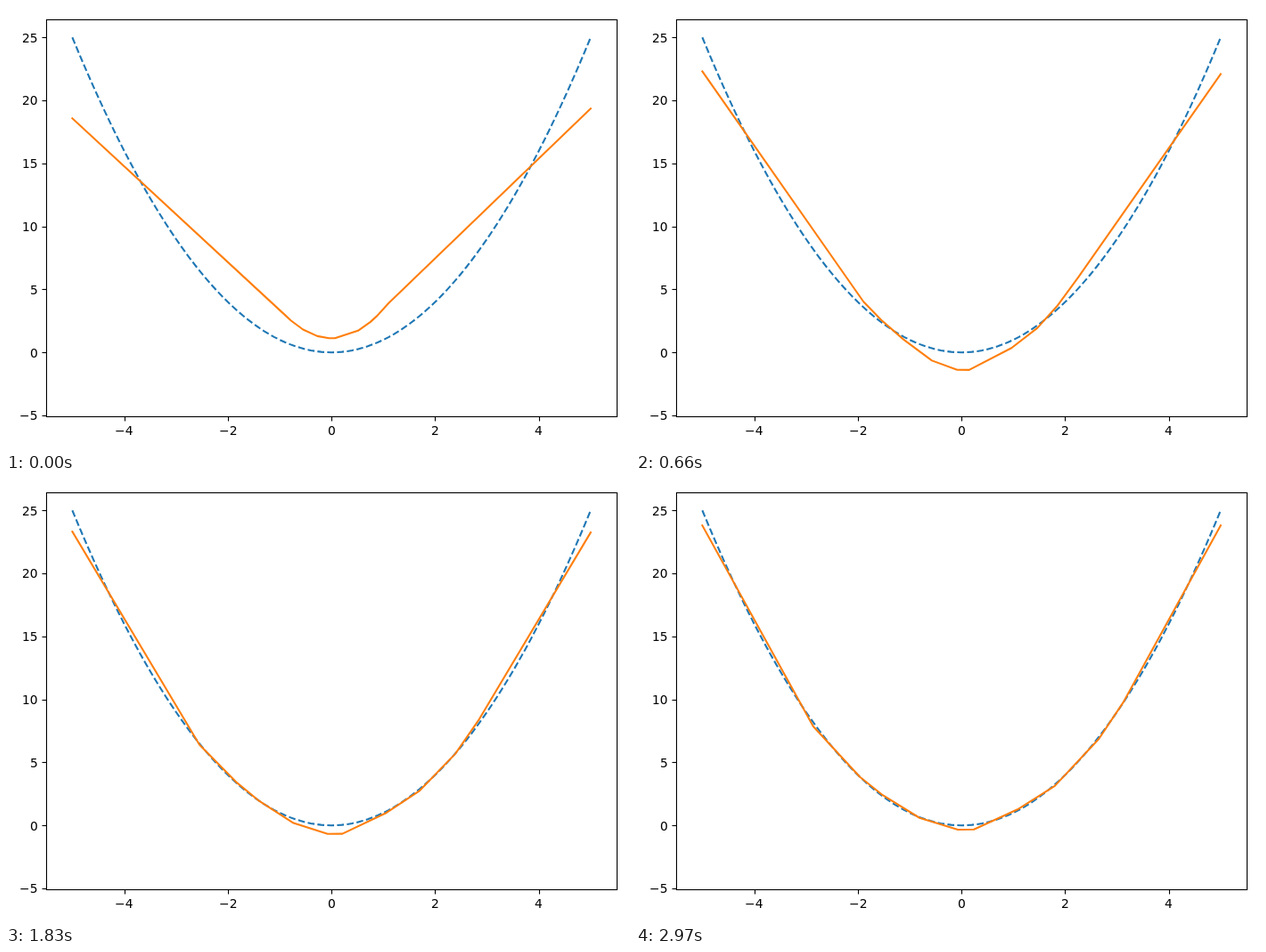
Write an HTML page with a canvas that moves like this. It is 700 by 500 pixels and loops after 3000 ms.

```html
<!DOCTYPE html>
<html lang="en">
<head>
<meta charset="utf-8">
<title>Curve fitting</title>
<style>
html, body { margin: 0; width: 700px; height: 500px; overflow: hidden; background: #fff; }
canvas { display: block; }
</style>
</head>
<body>
<canvas id="plot" width="700" height="500"></canvas>
<script>
const ctx = document.getElementById('plot').getContext('2d');
const LOOP = 3000, STEP = 30, EARLY = 420, LAST = LOOP - STEP;
const px = x => 365.15 + 58.15 * x;
const py = y => 389.2 - 14.158 * y;
const snap = v => Math.round(v) + 0.5;
const lerp = (a, b, u) => a + (b - a) * u;

// Each bend of the fit is [x, error against x²], after the fast phase and at the end.
const bends = [
  [[-1.6, 0.68], [-2.86, -0.33]],
  [[-1.42, 0.23], [-1.96, 0]],
  [[-1, -0.32], [-1.52, 0.09]],
  [[-0.5, -1.25], [-0.81, -0.06]],
  [[-0.09, -1.71], [-0.07, -0.34]],
  [[0.12, -1.72], [0.24, -0.38]],
  [[0.93, -0.79], [1.08, 0.1]],
  [[1.36, -0.24], [1.8, -0.11]],
  [[1.6, 0.4], [2.65, -0.16]],
  [[2, 1.15], [3.13, 0.03]]
];
const firstBend = ([x]) => [0.55 * x, 1.12 + 1.3 * (0.55 * x) ** 2];
const tracks = [
  [[-5, -6.42], [-5, -3.15], [-5, -1.2]],
  ...bends.map(([early, late]) => [firstBend(early), early, late]),
  [[5, -5.65], [5, -3.42], [5, -1.2]]
];

// Fast learning with a slight overshoot, then logarithmic progress.
function fitAt(t) {
  const fast = t < EARLY;
  const u = fast
    ? Math.sin(1.85 * t / EARLY) / Math.sin(1.85)
    : Math.log(t / EARLY) / Math.log(LAST / EARLY);
  return tracks.map(([first, early, late]) => {
    const [a, b] = fast ? [first, early] : [early, late];
    const x = lerp(a[0], b[0], u);
    return [x, x * x + lerp(a[1], b[1], u)];
  });
}

const parabola = Array.from({ length: 101 }, (_, i) => {
  const x = i / 10 - 5;
  return [x, x * x];
});

function curve(points, color, dash, cap) {
  ctx.beginPath();
  for (const [x, y] of points) ctx.lineTo(px(x), py(y));
  ctx.strokeStyle = color;
  ctx.lineWidth = 2.083;
  ctx.lineJoin = 'round';
  ctx.lineCap = cap;
  ctx.setLineDash(dash);
  ctx.stroke();
}

function line(x0, y0, x1, y1) {
  ctx.beginPath();
  ctx.moveTo(x0, y0);
  ctx.lineTo(x1, y1);
  ctx.stroke();
}

// Places a tick label so that the given part of its width lies left of x.
function label(value, x, part, baseline) {
  const text = String(value).replace('-', '\u2212');
  const left = x - part * ctx.measureText(text).width;
  ctx.fillText(text, Math.round(left), Math.round(baseline));
}

function axes() {
  ctx.setLineDash([]);
  ctx.lineCap = 'butt';
  ctx.lineJoin = 'miter';
  ctx.lineWidth = 1.11;
  ctx.strokeStyle = ctx.fillStyle = '#000';
  ctx.font = '13.89px "DejaVu Sans", sans-serif';
  ctx.strokeRect(45.5, 15.5, 640, 446);
  for (let v = -4; v <= 4; v += 2) {
    const x = snap(px(v));
    line(x, 461.5, x, 466.5);
    label(v, px(v), 0.5, 482);
  }
  for (let v = -5; v <= 25; v += 5) {
    const y = snap(py(v));
    line(40.5, y, 45.5, y);
    label(v, 35.7, 1, py(v) + 5.32);
  }
}

function draw(now) {
  const t = Math.floor(now % LOOP / STEP) * STEP;
  ctx.fillStyle = '#fff';
  ctx.fillRect(0, 0, 700, 500);
  curve(parabola, '#1f77b4', [7.71, 3.33], 'butt');
  curve(fitAt(t), '#ff7f0e', [], 'square');
  axes();
}

let start;
function tick(now) {
  start ??= now;
  draw(now - start);
  requestAnimationFrame(tick);
}
draw(0);
requestAnimationFrame(tick);
</script>
</body>
</html>
```
